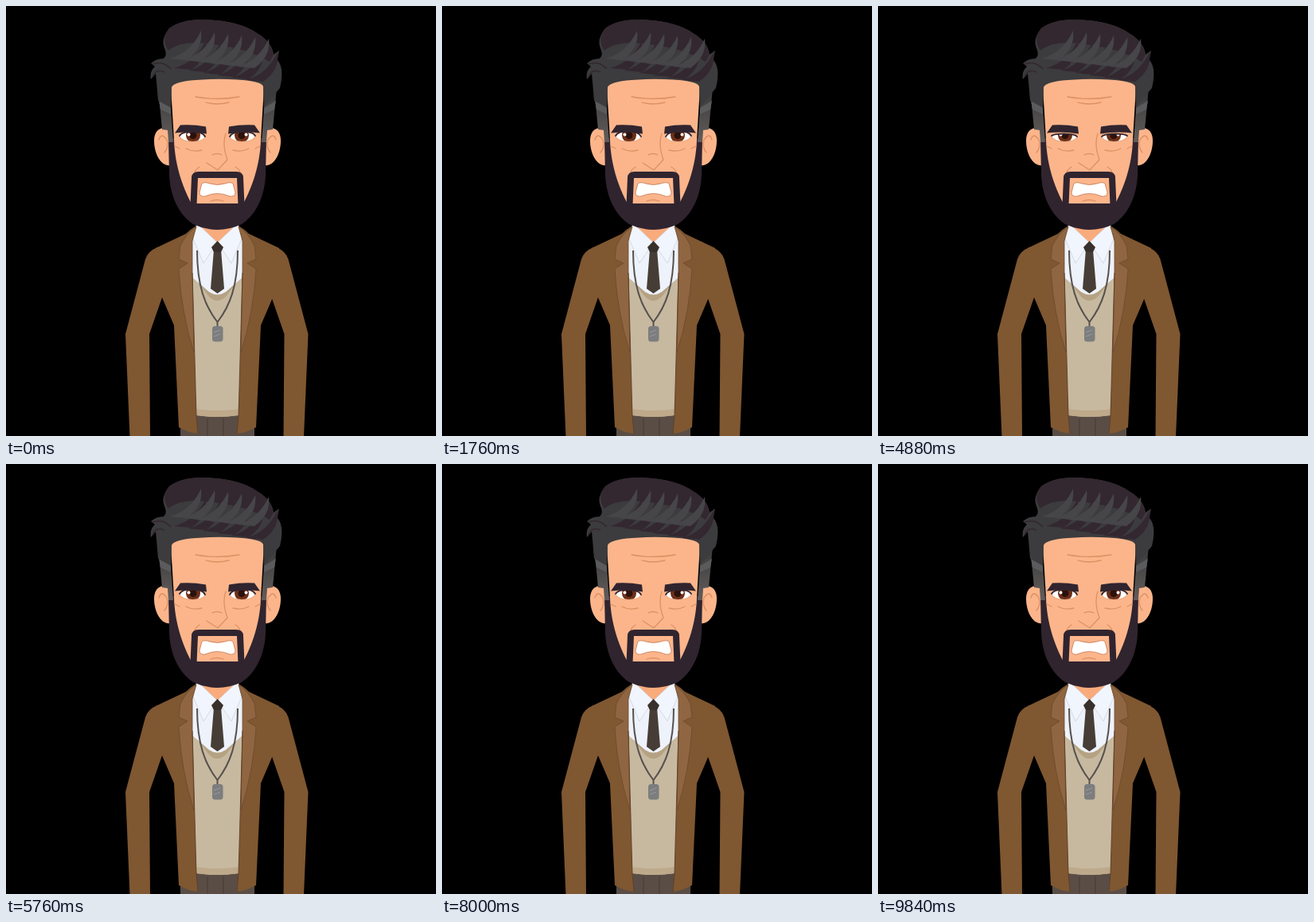
Recreate the animation shown at these times as an HTML page. Size 540 by 540 pixels, loop 9.92 s.

```html
<!DOCTYPE html>
<html lang="en">
<head>
<meta charset="utf-8">
<title>Grumpy man</title>
<style>
  html, body { margin: 0; width: 100%; height: 100%; overflow: hidden; background: #000; }
  svg { display: block; width: 100vw; height: 100vh; }
  .flip { transform: matrix(-1, 0, 0, 1, 531, 0); }
  .coat { fill: #7f5731; }
  .skin { fill: #fcb58b; }
  .dark { fill: #30242f; }
  .hair { fill: #3c3b3d; }
  .strand { fill: #33282f; }
  .light { fill: #464547; }
  .line { fill: none; stroke: #dc9163; stroke-width: 1.3; stroke-linecap: round; }
</style>
</head>
<body>
<svg viewBox="0 0 540 540">
  <defs>
    <linearGradient id="fade" x1="0" y1="0" x2="0" y2="1">
      <stop offset=".3" stop-color="#3c3b3d"/>
      <stop offset="1" stop-color="#625d5b"/>
    </linearGradient>
    <clipPath id="opening"><path id="eyeShape"/></clipPath>
  </defs>

  <!-- trousers, sweater, shirt -->
  <path fill="#594d45" d="M219 510H312V540H219Z"/>
  <path d="M253 518V540M273 518V540" stroke="#463c36" fill="none"/>
  <path fill="#c7b99f" d="M232 330H299L292 514Q265 518 239 514Z"/>
  <path fill="#bea98b" d="M238 506Q265 510 293 506L292 514Q265 518 239 514Z"/>
  <path fill="#b5a283" d="M232 335L254 364Q265 376 277 364L299 335Z"/>
  <path fill="#eef2fa" d="M233 288H298V340L276 359Q265.500 366 255 359L233 340Z"/>
  <path fill="#463d36" d="M261 306H270L274 355L265.500 361L257 355Z"/>

  <!-- neck and collar -->
  <g id="neck">
    <path fill="#f9ab7c" d="M239 264H292V280L265.500 298L239 280Z"/>
    <path id="collar" d="M240 273L234 290L248 323L265.500 297Z" fill="#f1f5fd" stroke="#c9ced8" stroke-width=".7"/>
    <use href="#collar" class="flip"/>
  </g>
  <path fill="#38302b" d="M265.500 295L273 303L270 309H261L258 303Z"/>

  <!-- coat -->
  <path id="arm" class="coat"/>
  <use href="#arm" transform="matrix(-1 0 0 1 529.500 0)"/>
  <g id="coat">
    <path class="coat" d="M239 276Q232 280 226 286L188 304V350L196 366L211 401L217 529Q229 536 241 537L239 514L234 335V295Z"/>
    <path d="M239 277Q226 286 219 301L217 318L228 323L217 330Q220 385 236 435L234 335V295Z" fill="#8f6641" stroke="#6d4a2d" stroke-width=".8"/>
    <path d="M234 335L239 514L241 537" fill="none" stroke="#5f4029" stroke-width=".9"/>
  </g>
  <use href="#coat" class="flip"/>

  <!-- necklace -->
  <path d="M240 307C240 352 250 377 265.500 397C281 377 291 352 291 307M265.500 396V404" fill="none" stroke="#56514e" stroke-width="2"/>
  <rect x="259" y="402" width="13.500" height="19.500" rx="3.500" fill="#7c7d7e"/>
  <path d="M261 410L269 407M261 415L269 412" stroke="#98999a"/>

  <g id="head">
    <g id="ear">
      <path class="skin" d="M207 156C195 149 186 156 186 169C186 185 194 202 207 200Z"/>
      <path class="line" d="M192 168Q195 158 202 168Q205 177 199 184"/>
    </g>
    <use href="#ear" class="flip"/>

    <path class="dark" d="M204 166L205 212C206 239 217 262 235 274Q250 281 265.500 281Q281 281 296 274C314 262 325 239 326 212L327 166Z"/>
    <path class="skin" d="M206 85H325L320 168C319 200 309 228 298 248H233C222 228 212 200 211 168Z"/>

    <!-- hair -->
    <g id="side">
      <path fill="url(#fade)" d="M189 82H208L207 128L210 171H204L203 156L196 155Z"/>
      <path d="M192 119L207 128V136L194 130Z" fill="#5b5b5d"/>
    </g>
    <use href="#side" class="flip"/>
    <path class="hair" d="M189 95L188 85L182 92Q180 82 187 76L182 72Q188 66 198 66Q203 62 199 53Q194 42 205 28Q220 17 247 17Q292 18 315 34Q334 45 336 61L343 56Q341 64 341 68Q350 78 344 103L324 127L323 101Q320 94 290 92.500Q265 91 238 93Q211 95 208 102L207 127L191 119Z"/>
    <path class="strand" d="M205 28Q220 17 247 17Q292 18 315 34Q332 44 336 61L331 70Q300 50 240 46Q215 46 204 56Q194 42 205 28Z"/>
    <g id="strands"></g>
    <path d="M184 73Q197 68 207 79M184 89Q188 78 199 83" fill="none" stroke="#33282f" stroke-width="1.500"/>

    <!-- face lines -->
    <path class="line" d="M238 114Q265 119 293 114M251 121Q265 125 280 121"/>
    <path class="line" d="M276 160Q271 174 278 193L266 206L252 197M259 187Q265 184 271 187"/>
    <path id="bag" class="line" d="M226 179Q235 184 246 181M212 176L218 179M243 202Q238 205 237 209"/>
    <use href="#bag" class="flip"/>

    <!-- eyes -->
    <g id="eye">
      <path fill="#efa97d" d="M217 164Q220 155 234 155Q249 155 251 164Q247 171 234 171Q221 171 217 164Z"/>
      <g clip-path="url(#opening)">
        <path fill="#fff" d="M214 145H254V176H214Z"/>
        <circle cx="235" cy="162.500" r="9" fill="#6d2f17"/>
        <circle cx="235" cy="162.500" r="4.500" fill="#2b110c"/>
        <circle cx="229.500" cy="161.500" r="2" fill="#fff"/>
      </g>
      <path id="lash" fill="none" stroke="#30242f" stroke-width="1.800" stroke-linecap="round"/>
      <path id="brow" class="dark" d="M212 159.500L219 149.500Q235 148.500 251 151.500L252 160.500Q232 157 212 159.500Z"/>
    </g>
    <use href="#eye" class="flip"/>

    <!-- mouth -->
    <path d="M235.500 250L237 216Q237 212 242 212H289Q294 212 294 216L295.500 250" fill="none" stroke="#30242f" stroke-width="8"/>
    <path d="M246 223Q249 220.500 256 223Q265.500 226 275 223Q282 220.500 285 223L288 234Q288 240 281 239Q265.500 232 250 239Q243 240 243 234Z" fill="#fff" stroke="#c4764f" stroke-width=".8"/>
    <path class="line" d="M257 245Q265 242 273 245"/>
  </g>
</svg>
<script>
const LOOP = 9920, STEP = 80, BEAT = LOOP / 5, PEAK = 1088, LEAD = 240;
const el = id => document.getElementById(id);
const shift = (id, y) => el(id).setAttribute('transform', `translate(0 ${y})`);

function ramp(from, to, p) {
  const k = Math.min(1, Math.max(0, (p - from) / (to - from)));
  return k * k * (3 - 2 * k);
}

function combHair() {
  const blade = (type, x, y) => `<path class="${type}" d="M${x} ${y}q27-7 40-35q3 22-18 37z"/>`;
  let out = '';
  for (let i = 0; i < 6; i++) {
    out += blade('light', 205 + 17 * i, 66 + 2 * i) + blade('strand', 211 + 18 * i, 78 + 3 * i);
  }
  el('strands').innerHTML = out;
}

function draw(ms) {
  const t = Math.floor((ms % LOOP) / STEP) * STEP;
  // p: time from the middle of the nearest blink
  const p = (t - PEAK + LEAD + LOOP) % BEAT - LEAD;
  const shut = ramp(-176, -60, p) - ramp(30, 128, p);
  const lift = ramp(60, 150, p) - ramp(200, 520, p);
  const droop = (p - 128 + BEAT) % BEAT / BEAT;

  const y = 3.5 * shut - 2 * lift;
  shift('head', y);
  shift('neck', y * .7);
  shift('brow', 2.5 * shut - lift);

  const open = 153 + 8 * droop;
  const lid = open + (172 - open) * shut;
  const lash = `M218 163C222 ${lid} 246 ${lid} 250 164`;
  el('lash').setAttribute('d', lash);
  el('eyeShape').setAttribute('d', lash + 'C246 172 222 172 218 163Z');

  const out = 3 * shut, elbow = 412 - 4 * shut, hand = 8 * shut;
  el('arm').setAttribute('d', `M190 303Q178 308 175 318L${150 - out} ${elbow}L${155.5 - hand} 541`
    + `H${181 - hand}L${180 - out} ${elbow}L196 366L212 340Z`);
}

const start = performance.now();
function tick() {
  draw(performance.now() - start);
  requestAnimationFrame(tick);
}
combHair();
draw(0);
requestAnimationFrame(tick);
</script>
</body>
</html>
```
